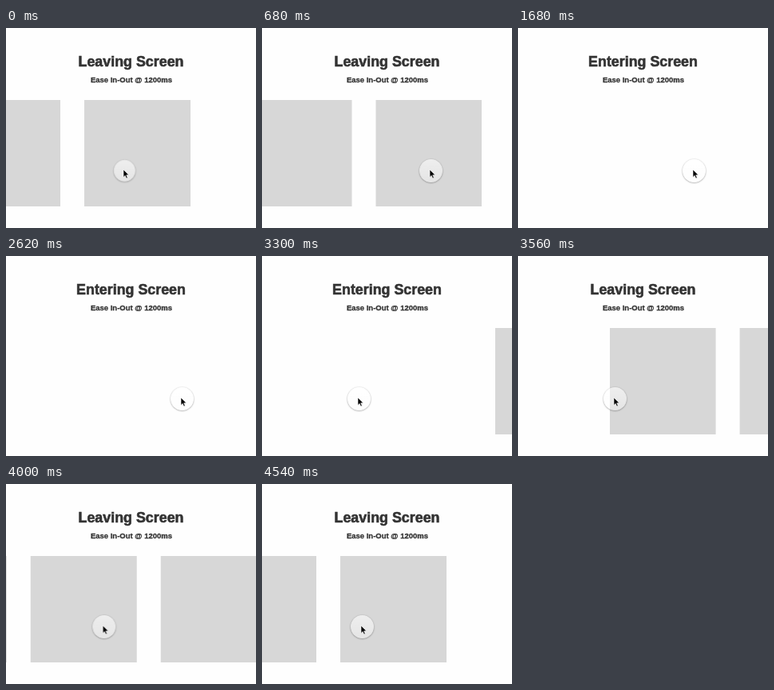
Write an HTML page that moves like this. It is 313x250 px and loops after 4.56 s.

```html
<!DOCTYPE html>
<html lang="en">
<head>
<meta charset="utf-8">
<title>Leaving and entering</title>
<style>
  html, body { margin: 0; width: 100%; height: 100%; overflow: hidden; background: #fefefe; }
  #stage { position: relative; width: 313px; height: 250px; overflow: hidden; }
  #stage > * { position: absolute; left: 0; top: 0; }
  #strip i { position: absolute; top: 90px; width: 133px; height: 133px; background: #d7d7d7; }
  text {
    font: bold 17.85px "Liberation Sans", Arial, sans-serif;
    text-anchor: middle; fill: #333; stroke: #333; stroke-width: .6px;
  }
  text.sub { font-size: 9.5px; stroke-width: .3px; }
  #knob {
    position: absolute; left: -14.5px; top: 163.6px; width: 29px; height: 29px; border-radius: 50%;
    background: linear-gradient(rgba(255,255,255,.58), rgba(255,255,255,.36));
    box-shadow: 0 .6px 2px rgba(0,0,0,.42);
  }
  #arrow { position: absolute; left: -3px; top: 175.4px; overflow: visible; }
</style>
</head>
<body>
<div id="stage">
  <div id="strip"></div>
  <svg width="313" height="250">
    <text id="leaving" x="156.5" y="48">Leaving Screen</text>
    <text id="entering" x="156.5" y="48">Entering Screen</text>
    <text class="sub" x="157" y="67.6">Ease In-Out @ 1200ms</text>
  </svg>
  <div id="pointer">
    <div id="knob"></div>
    <svg id="arrow" width="12" height="16">
      <path transform="translate(2 2) scale(.88)" fill="#000" stroke="#fff" stroke-width=".7"
        d="M0 0V10.8L2.5 8.5 4.2 12.5 6 11.7 4.3 7.8H7.8Z"/>
    </svg>
  </div>
</div>
<script>
  const LOOP = 4560;
  const SIZE = 133, GAP = 30, COUNT = 4, LAST_X = 98;
  const TRAVEL = 720;
  const byId = id => document.getElementById(id);

  // Each step is [time in ms, value, easing towards the next step].
  function play(id, property, steps, format = v => v) {
    const frames = steps.map(([time, value, easing = 'linear']) =>
      ({ offset: time / LOOP, [property]: format(value), easing }));
    byId(id).animate(frames, { duration: LOOP, iterations: Infinity });
  }

  const shift = x => `translateX(${x}px)`;
  const scale = s => `scale(${s})`;

  for (let n = 0; n < COUNT; n++) {
    const square = document.createElement('i');
    square.style.left = `${LAST_X - n * (SIZE + GAP)}px`;
    byId('strip').append(square);
  }

  play('strip', 'transform', [
    [0, 0], [482, 0, 'ease-in-out'], [1622, TRAVEL],
    [3109, TRAVEL, 'ease-in-out'], [4304, 0], [LOOP, 0]
  ], shift);

  const toEntering = 880, toLeaving = 3500;
  const titleSteps = (outer, inner) => [
    [0, outer, 'step-end'], [toEntering, inner, 'step-end'],
    [toLeaving, outer, 'step-end'], [LOOP, outer]
  ];
  play('leaving', 'opacity', titleSteps(1, 0));
  play('entering', 'opacity', titleSteps(0, 1));

  play('pointer', 'transform', [
    [0, 148, 'step-end'], [60, 152, 'ease-out'], [330, 241, 'ease-in-out'],
    [620, 211], [680, 211], [1680, 220], [2620, 220, 'ease-in-out'],
    [3020, 114, 'ease-in-out'], [3220, 121], [3740, 121], [4540, 125], [LOOP, 125]
  ], shift);

  play('knob', 'transform', [
    [0, .93], [420, .93], [520, 1], [2620, 1], [2700, .93],
    [3040, .93], [3140, 1], [LOOP, 1]
  ], scale);
</script>
</body>
</html>
```
